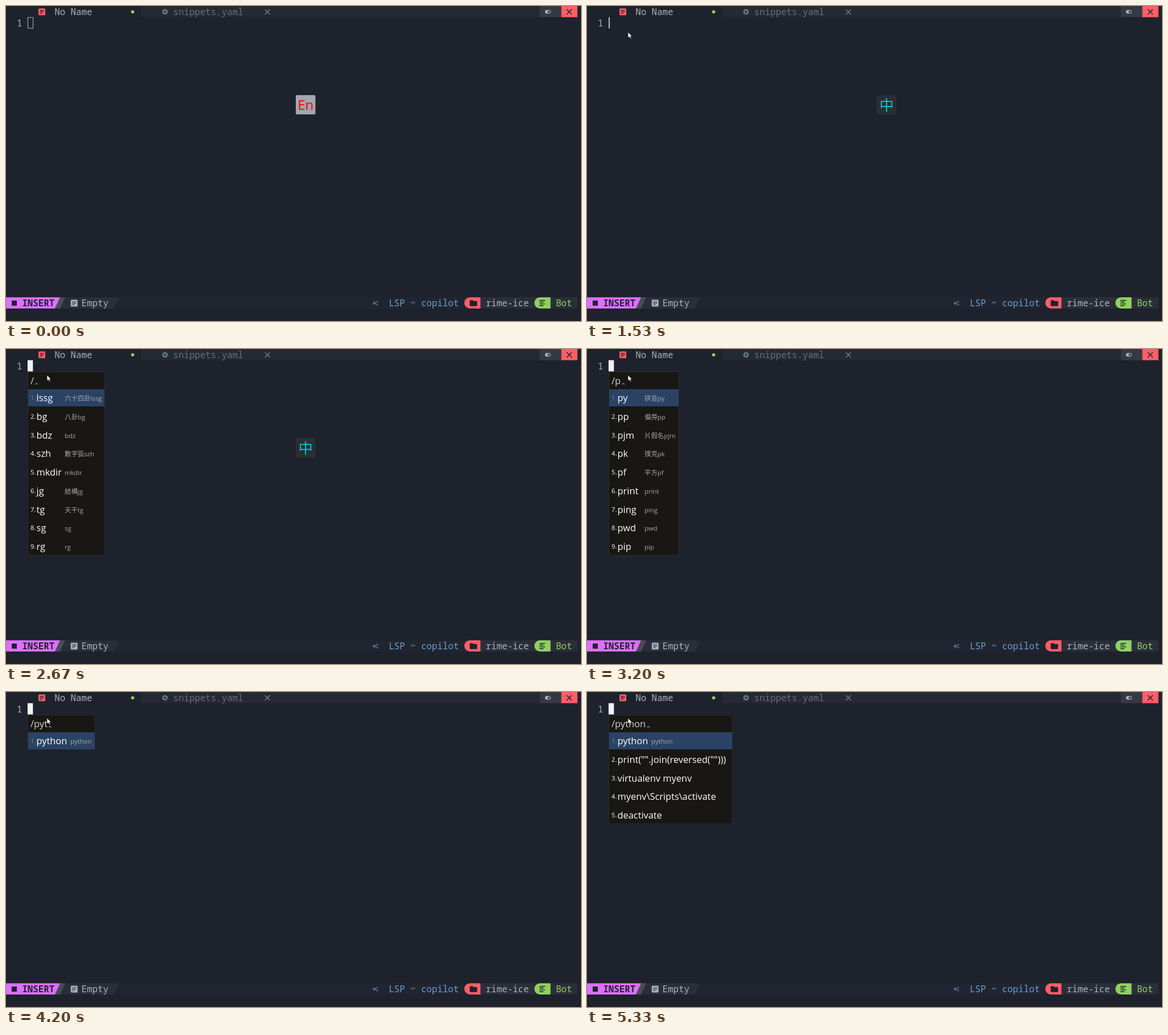
An HTML page for the animation above (7140 ms loop, 1010 by 555 pixels).

```html
<!DOCTYPE html>
<html lang="en">
<head>
<meta charset="utf-8">
<title>Snippet input</title>
<style>
  html, body { margin: 0; width: 100%; height: 100%; overflow: hidden; background: #1e222d; }
  svg { display: block; width: 1010px; height: 555px; }
  text { white-space: pre; }
  .mono { font: 15.78px "Noto Sans Mono", "DejaVu Sans Mono", monospace; fill: #abb2bf; }
  .ui { font-family: "Open Sans", "Noto Sans", "Noto Sans CJK TC", "Noto Sans CJK SC", "Noto Sans CJK JP", sans-serif; }
  .comp { font-size: 16.5px; fill: #d6d5d1; }
  .cand { font-size: 16.35px; fill: #fff; }
  .num { font-size: 11.2px; fill: #fff; }
  .num.first { fill: #6d7f95; }
  .note { font-size: 11.4px; fill: #a8a8a6; }
  .hidden { display: none; }
</style>
</head>
<body>
<svg id="stage" viewBox="0 0 1010 555" xmlns="http://www.w3.org/2000/svg">
  <defs>
    <g id="doc">
      <rect width="12" height="12" rx="1.5"/>
      <path d="M2.5 3.5h7M2.5 6h7M2.5 8.5h4.5" stroke="#1e222d" stroke-width="1.2"/>
    </g>
    <g id="gear" fill="none" stroke="currentColor">
      <circle r="3" stroke-width="2"/>
      <circle r="4.5" stroke-width="1.6" stroke-dasharray="1.77 1.77"/>
    </g>
    <path id="cross" d="M-4.5 -4.5L4.5 4.5M4.5 -4.5L-4.5 4.5"/>
  </defs>

  <!-- tab line -->
  <rect x="236.7" width="700.8" height="19.7" fill="#252933"/>
  <use href="#doc" x="57" y="4.2" fill="#ff5d68"/>
  <text class="mono" x="85.2" y="16">No Name</text>
  <circle cx="222.5" cy="10.3" r="2.8" fill="#8fd160"/>
  <use href="#gear" x="279.3" y="10.2" color="#63838c"/>
  <text class="mono" x="293.6" y="16" style="fill:#6a6f7a">snippets.yaml</text>
  <use href="#cross" x="459.2" y="10.3" stroke="#7c818c" stroke-width="1.3"/>
  <rect x="937.5" width="37.9" height="19.7" fill="#353943"/>
  <rect x="946.8" y="7" width="10" height="6.3" rx="3.15" fill="#abb2bf"/>
  <circle cx="953.6" cy="10.15" r="2.1" fill="#353943"/>
  <rect x="975.4" width="28.4" height="19.7" fill="#ff5d68"/>
  <use href="#cross" x="989.4" y="10.3" stroke="#1e222d" stroke-width="1.5"/>

  <text class="mono" x="18.9" y="36">1</text>

  <!-- status line -->
  <rect x="0" y="513.2" width="1003.8" height="19.8" fill="#21252f"/>
  <path d="M95 513.2H199L189 533H86Z" fill="#2a2e39"/>
  <path d="M95 513.2H104L95 533H86Z" fill="#484c56"/>
  <path d="M0 513.2H95L86 533H0Z" fill="#dc6fff"/>
  <rect x="10" y="519" width="9" height="9" fill="#1e222d"/>
  <text class="mono" x="28.4" y="529" style="font-weight:700;fill:#1e222d">INSERT</text>
  <use href="#doc" x="113.7" y="517.5" fill="#abb2bf"/>
  <text class="mono" x="132.6" y="529">Empty</text>
  <g color="#6c9ed6">
    <use href="#gear" transform="translate(647 523.5) scale(.52)"/>
    <use href="#gear" transform="translate(651.8 521) scale(.32)"/>
    <use href="#gear" transform="translate(651.8 526) scale(.32)"/>
  </g>
  <text class="mono" x="672.4" y="529" style="fill:#6c9ed6">LSP ~ copilot</text>
  <rect x="833.4" y="513.2" width="170.4" height="19.8" fill="#2a2e39"/>
  <path d="M833.4 513.2H814.9a9.9 9.9 0 0 0 0 19.8H833.4Z" fill="#ff5d68"/>
  <path d="M814.5 519.5q0 -1.3 1.3 -1.3h3.7l1.5 1.5h5.2q1.4 0 1.4 1.4v6.2q0 1.4 -1.4 1.4h-10.4q-1.3 0 -1.3 -1.4Z" fill="#1e222d"/>
  <text class="mono" x="842.8" y="529">rime-ice</text>
  <path d="M956.5 513.2H938a9.9 9.9 0 0 0 0 19.8H956.5Z" fill="#8fd160"/>
  <path d="M937 518.7h10M937 521.8h7M937 524.9h10M937 528h7" stroke="#1e222d" stroke-width="1.4"/>
  <text class="mono" x="965.9" y="529" style="fill:#8fd160">Bot</text>

  <!-- input mode badge -->
  <g id="latin" class="ui" text-anchor="middle">
    <rect x="509" y="157" width="34.5" height="34" rx="2" fill="#a3a6ac"/>
    <text x="526.2" y="183" font-size="24" fill="#f50008">En</text>
  </g>
  <g id="han" class="ui" text-anchor="middle">
    <rect x="509" y="157" width="34.5" height="34" rx="2" fill="#2b2e32"/>
    <text x="526.2" y="184" font-size="25" fill="#00c7d9">中</text>
  </g>

  <!-- text cursor shapes -->
  <rect id="hollow" x="38.4" y="20.2" width="9.2" height="19" fill="none" stroke="#b0b5c1"/>
  <rect id="bar" x="37.9" y="19.7" width="2.2" height="19.8" fill="#abb2bf"/>
  <rect id="block" x="37.9" y="19.7" width="9.4" height="19.8" fill="#f1f2f3"/>

  <g id="popups"></g>
  <path id="mouse" d="M0 0V10L2.4 8L4.1 11.6L5.8 10.9L4.2 7.4H7.3Z" fill="#fff" stroke="#111" stroke-width=".7"/>
</svg>
<script>
const LOOP = 7140;
const $ = id => document.getElementById(id);

const PYTHON = ["python", "python"];
const one = (at, text) => ({ at, text, right: 156, col: 113, rows: [PYTHON] });

// Each popup stays until the next one; a row is [candidate, note].
const popups = [
  { at: 2670, text: "/", right: 173, col: 103, rows: [
    ["lssg", "六十四卦lssg"], ["bg", "八卦bg"], ["bdz", "bdz"], ["szh", "數字弧szh"],
    ["mkdir", "mkdir"], ["jg", "結構jg"], ["tg", "天干tg"], ["sg", "sg"], ["rg", "rg"]] },
  { at: 3200, text: "/p", right: 161, col: 101, rows: [
    ["py", "拼音py"], ["pp", "偏旁pp"], ["pjm", "片假名pjm"], ["pk", "撲克pk"],
    ["pf", "平方pf"], ["print", "print"], ["ping", "ping"], ["pwd", "pwd"], ["pip", "pip"]] },
  { at: 3730, text: "/py", right: 156, col: 113, rows: [
    ["py", "拼音py"], PYTHON, ..."āáǎàōóǒ"] },
  one(4200, "/pyt"),
  one(4600, "/pyth"),
  one(4870, "/pytho"),
  { at: 5330, text: "/python", right: 255, col: 113, rows: [
    PYTHON, ['print("".join(reversed("")))'], ["virtualenv myenv"],
    ["myenv\\Scripts\\activate"], ["deactivate"]] },
];

// Pointer positions; the pointer is absent before the first.
const moves = [
  [1070, 69, 37], [1200, 70, 39], [1270, 71, 42], [1330, 72, 45], [1400, 72, 46],
];
const FOCUS = 1530, BADGE_OFF = 3000, COMPOSE = popups[0].at;

function add(parent, tag, attrs, text) {
  const el = document.createElementNS("http://www.w3.org/2000/svg", tag);
  for (const k in attrs) el.setAttribute(k, attrs[k]);
  if (text) el.textContent = text;
  return parent.appendChild(el);
}

function buildPopup({ text, right, col, rows }) {
  const g = add($("popups"), "g", { class: "ui" });
  const rowY = i => 86.2 + 32.75 * i;
  const bottom = rowY(rows.length - 1) + 15;
  add(g, "rect", { x: 38.5, y: 40.5, width: right - 38.5, height: bottom - 40.5,
    fill: "#181714", stroke: "#2a2b2e" });
  add(g, "rect", { x: 39, y: 71, width: right - 39, height: 30, fill: "#2a4365" });
  const comp = add(g, "text", { class: "comp", x: 43, y: 62 }, text);
  const end = 43 + comp.getComputedTextLength() + 2.3;
  add(g, "path", { d: `M${end} 62.5l2.3 -2.2l2.3 2.2`, fill: "none", stroke: "#3f93d6", "stroke-width": 1.1 });
  rows.forEach((row, i) => {
    const [cand, note] = row;
    const base = Math.round(rowY(i) + 5.8);
    add(g, "text", { class: i ? "num" : "num first", x: 43, y: base - 2 }, i + 1 + ".");
    add(g, "text", { class: "cand", x: 53.6, y: base }, cand);
    if (note) add(g, "text", { class: "note", x: col, y: base - 1 }, note);
  });
  return g;
}

const show = (el, on) => el.classList.toggle("hidden", !on);
const groups = popups.map(buildPopup);

function draw(t) {
  show($("latin"), t < FOCUS);
  show($("han"), t >= FOCUS && t < BADGE_OFF);
  show($("hollow"), t < FOCUS);
  show($("bar"), t >= FOCUS && t < COMPOSE);
  show($("block"), t >= COMPOSE);

  const current = popups.findLastIndex(p => t >= p.at);
  groups.forEach((g, i) => show(g, i === current));

  const pos = moves.findLast(m => t >= m[0]);
  show($("mouse"), !!pos);
  if (pos) $("mouse").setAttribute("transform", `translate(${pos[1]} ${pos[2]})`);
}

const start = performance.now();
function tick() {
  draw((performance.now() - start) % LOOP);
  requestAnimationFrame(tick);
}
tick();
</script>
</body>
</html>
```
